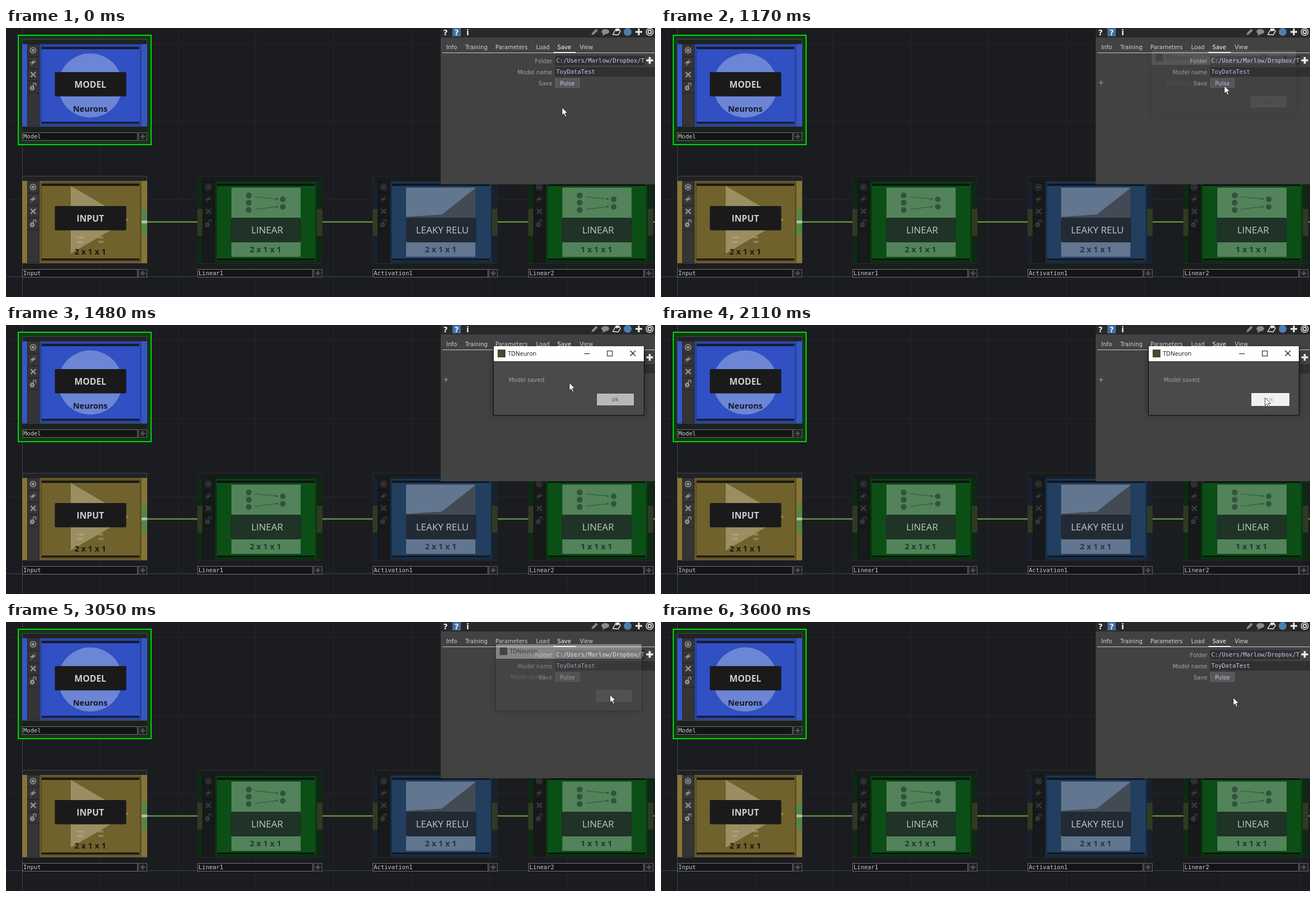
Write an HTML page that moves like this. It is 1163 by 482 pixels and loops after 3830 ms.

```html
<!DOCTYPE html>
<html lang="en">
<head>
<meta charset="utf-8">
<title>Saving a model</title>
<style>
  html, body { margin: 0; width: 100%; height: 100%; overflow: hidden; background: #1b1c20; }
  svg { display: block; width: 100vw; height: 100vh; }
  text { white-space: pre; }
  .ui { font: 10.1px "DejaVu Sans", sans-serif; }
  .mono { font: 10.5px "DejaVu Sans Mono", monospace; }
  .node { font: 17px "Open Sans", sans-serif; }
</style>
</head>
<body>
<svg id="stage" viewBox="0 0 1163 482" preserveAspectRatio="none"></svg>
<script>
const LOOP = 3830, STEP = 78.16;

const rect = (x, y, w, h, fill, more = '') =>
  `<rect x="${x}" y="${y}" width="${w}" height="${h}" fill="${fill}" ${more}/>`;
const frame = (x, y, w, h, stroke, fill = 'none', more = '') =>
  rect(x + .5, y + .5, w - 1, h - 1, fill, `stroke="${stroke}" ${more}`);
const path = (d, stroke, width = 1, fill = 'none', more = '') =>
  `<path d="${d}" stroke="${stroke}" stroke-width="${width}" fill="${fill}" ${more}/>`;
const shape = (d, fill) => `<path d="${d}" fill="${fill}"/>`;
const dot = (x, y, r, fill, more = '') => `<circle cx="${x}" cy="${y}" r="${r}" fill="${fill}" ${more}/>`;
const text = (x, y, str, fill, cls = 'ui', more = '') =>
  `<text x="${x}" y="${y}" fill="${fill}" class="${cls}" ${more}>${str}</text>`;
const centred = (x, y, str, fill, size, bold) =>
  text(x, y, str, fill, 'node', `text-anchor="middle" style="font-size:${size}px;font-weight:${bold ? 700 : 400}"`);
const plus = (x, y, r, colour, width) =>
  path(`M${x - r} ${y}h${2 * r}M${x} ${y - r}v${2 * r}`, colour, width);

function grid() {
  let s = rect(0, 0, 1163, 482, '#1b1c20');
  for (let i = 1; i < 9; i++) s += rect(Math.floor(29.5 + i * 139.45), 0, 1, 482, '#26272b');
  for (const y of [27, 167, 307]) s += rect(0, y, 1163, 1, '#26272b');
  return s + rect(29, 0, 1, 482, '#3f4150') + rect(0, 445, 1163, 1, '#32446a');
}

function flags(colour, cell, gap) {
  let s = rect(9, 9, 22, 147, gap);
  for (let i = 0; i < 4; i++) s += rect(10, 10 + i * 21.8, 20, 20.5, cell);
  s += rect(10, 97, 20, 58, cell);
  return s + dot(19.5, 20, 5, 'none', `stroke="${colour}" stroke-width="1.7"`) + dot(19.5, 20, 2.6, colour)
    + shape('M24 35L13 43.5L18.5 43L14 48.5L26 39.5L20 40.5Z', colour)
    + path('M15.2 59.2l9 8.6m0-8.6l-9 8.6', colour, 2.5)
    + dot(18, 87.5, 4.2, colour) + dot(18, 87.5, 1.2, cell)
    + path('M20 84v-3a2.3 2.3 0 0 1 4.6 0v3', colour, 1.5);
}

// One operator tile, in coordinates relative to its top left corner
function node(x, y, name, c, content) {
  const s = frame(0, 0, 224, 157, c.edge, c.top)
    + rect(0, 9, 224, 147, c.side) + rect(31, 9, 183, 147, c.body)
    + flags(c.icon, c.cell, c.gap)
    + rect(33, 11, 180, 142, c.rim) + rect(35, 12, 176, 140, c.view)
    + rect(35, 13.5, 175, 4.5, c.bar) + rect(35, 148, 175, 3.5, c.bar)
    + (c.ports || '') + content
    + frame(0, 167, 207, 15, '#747474', '#131415') + frame(208, 167, 16, 15, '#646464', '#1d1e1f')
    + plus(216, 174.5, 4.5, '#525252', 2.6) + text(2, 178, name, '#cfcfcf', 'mono');
  return `<g transform="translate(${x} ${y})">${s}</g>`;
}

const dimPorts = rect(0, 59, 9, 48, '#303a22') + rect(214, 59, 10, 48, '#303a22');
const dim = { edge: '#292c2b', top: '#181b1b', icon: '#393e3d', cell: '#17191a', gap: '#101213', bar: '#0c1410', ports: dimPorts };
const green = { ...dim, side: '#0d2913', body: '#092d10', rim: '#0a3a12', view: '#0c4f16' };
const navy = { ...dim, side: '#17222e', body: '#18283b', rim: '#1b3049', view: '#233f60', bar: '#0e1722' };
const lit = { edge: '#45474a', top: '#202226', icon: '#929292', cell: '#353535', gap: '#232323' };
const blue = { ...lit, side: '#3557c4', body: '#2a469f', rim: '#28408f', view: '#3050c3', bar: '#151b33' };
const ochre = {
  ...lit, side: '#867535', body: '#6d5c2b', rim: '#574a23', view: '#70622d', bar: '#1c1a12',
  ports: rect(214, 59, 10, 48, '#558545') + rect(214, 80, 10, 5, '#b4bdae')
};

const brightLabel = (y, base, str) => rect(58.5, y, 128, 43.5, '#1a1a1b', 'rx="2"')
  + centred(122, base, str, '#cdcdcd', 15.8, true);
const dimLabel = (str, fill, edge, ink) =>
  rect(60.5, 75.5, 124.5, 43, fill, `rx="2" stroke="${edge}"`) + centred(125, 103, str, ink, 17);

function linear(dims) {
  const ink = '#31543b';
  let s = rect(61, 21, 124, 124, '#52835a');
  for (const y of [35, 48, 61]) s += dot(92, y, 5.2, ink);
  for (const y of [42, 55.5]) s += dot(153, y, 5, ink);
  s += path('M103 37.5L143 41.5M103 60L143 55', ink, 1.2) + dot(142, 41.4, 1.8, ink) + dot(142, 55.2, 1.8, ink);
  return s + dimLabel('LINEAR', '#1f3326', '#1b2c21', '#c3c9c4') + centred(122, 137, dims, '#223c29', 14.5, true);
}

const modelArt = dot(122, 83, 57.5, '#6c85d5') + brightLabel(59, 86.5, 'MODEL')
  + centred(122, 130, 'Neurons', '#14182a', 14.5, true);

const tiny = (x, y, str) => text(x, y, str, '#d0cab0', 'ui', 'style="font-size:5px"');
const inputArt = shape('M87 18L191 78.5L87 139Z', '#9a8f63') + brightLabel(54, 81.7, 'INPUT')
  + tiny(99, 112, 'train') + tiny(136, 112, '500') + tiny(99, 119.5, 'test') + tiny(136, 119.5, '100')
  + centred(122, 141, '2 x 1 x 1', '#1e1a10', 14.5, true);

const reluArt = rect(60, 21, 124, 124, '#63768f') + shape('M60 74L123 70L184 22V77H60Z', '#424a54')
  + path('M60 74L123 70', '#39434f')
  + dimLabel('LEAKY RELU', '#222b35', '#1c242d', '#c3c7cb') + centred(122, 137, '2 x 1 x 1', '#26364a', 14.5, true);

function network() {
  const wire = (a, b) => rect(a, 346.5, b - a, 2, '#6cad45');
  return grid()
    + rect(22, 13, 238, 196, '#143619', 'stroke="#00dc05" stroke-width="2"')
    + rect(29, 20, 224, 183, '#1c211e')
    + node(29, 20, 'Model', blue, modelArt)
    + node(29, 265, 'Input', ochre, inputArt)
    + node(343, 265, 'Linear1', green, linear('2 x 1 x 1'))
    + node(657, 265, 'Activation1', navy, reluArt)
    + node(936, 265, 'Linear2', green, linear('1 x 1 x 1'))
    + wire(253, 343) + wire(567, 657) + wire(881, 936) + wire(1160, 1163);
}

function headerIcons() {
  const big = (x, str) => text(x, 12.5, str, '#f0f0f0', 'ui', 'text-anchor="middle" style="font-size:14px;font-weight:700"');
  return big(787.5, '?') + rect(800, 0, 15, 15, '#3f6f9f') + big(807.5, '?') + big(827.5, 'i')
    + shape('M1049 13l1.5-4.5 7-7 3 3-7 7z', '#8a8a8a')
    + '<ellipse cx="1074" cy="6.5" rx="7" ry="4.6" fill="#8a8a8a"/>' + shape('M1070 9l-1 5 6-3z', '#8a8a8a')
    + path('M1087.5 11.5L1092 3.5L1098 1.5L1101 6L1097 12.5Z', '#e4e4e4', 1.5) + shape('M1092 1h6l1 4-6 1z', '#e4e4e4')
    + dot(1114, 7, 7, '#4b80b0') + plus(1134, 7, 6, '#f0f0f0', 3)
    + dot(1153.5, 7, 6.3, 'none', 'stroke="#e4e4e4" stroke-width="1.5"')
    + dot(1153.5, 7, 3, 'none', 'stroke="#e4e4e4" stroke-width="1.8"');
}

function panel() {
  const tabs = { Info: 789, Training: 823, Parameters: 877, Load: 950, Save: 988, View: 1028 };
  const rows = [['Folder', 63], ['Model name', 83], ['Save', 103]];
  return rect(779, 0, 384, 280, '#424242') + rect(779, 0, 384, 17, '#292929') + headerIcons()
    + Object.entries(tabs).map(([name, x]) => text(x, 38, name, name === 'Save' ? '#fff' : '#d2d2d2')).join('')
    + rect(782, 44, 381, 1, '#c8c8c8') + rect(981, 43, 40, 2, '#f4f4f4')
    + rows.map(([name, y]) => text(979, y, name, '#a4a4a4', 'ui', 'text-anchor="end"')).join('')
    + rect(984, 50, 161, 17, '#303030') + rect(984, 70, 179, 17, '#303030')
    + text(986, 62, 'C:/Users/Marlow/Dropbox/T', '#cdc3f2', 'mono')
    + text(986, 82, 'ToyDataTest', '#cdc3f2', 'mono')
    + plus(1153.5, 58, 6, '#ededed', 3.6)
    + '<rect id="pulse" x="984.5" y="90.5" width="43" height="16" stroke="#666"/>'
    + text(1006, 103, 'Pulse', '#cdc3f2', 'ui', 'text-anchor="middle"')
    + `<g id="mark">${plus(788.5, 98, 4, '#a8a8a8', 1)}</g>`;
}

function dialog() {
  return '<g id="dialog">'
    + rect(873, 42, 271, 119, '#000', 'opacity=".4" filter="url(#soft)"')
    + frame(873, 38, 271, 124, '#0c0c0c', '#4a4a4a') + rect(874, 38, 269, 27, '#fff') + rect(874, 65, 269, 1, '#262626')
    + rect(881, 44, 14, 14, '#454a30')
    + text(899.5, 55, 'TDNeuron', '#111', 'ui', 'style="font-family:\'Open Sans\',sans-serif;font-size:10.6px"')
    + `<g id="controls">${path('M1036 51.5h10', '#111') + frame(1077, 46, 10, 10, '#111')
      + path('M1118.5 46l9.5 9.5m0-9.5l-9.5 9.5', '#111', 1.1)}</g>`
    + text(901, 102, 'Model saved.', '#a2a2a2')
    + '<rect id="ok"/>'
    + text(1091.5, 137, 'ok', '#5c5c5c', 'ui', 'id="okText" text-anchor="middle" style="font-size:10.6px"')
    + '</g>';
}

const pointer = '<path id="pointer" d="M.5 .5V14.4L3.7 11.4L6 16.8L8.3 15.8L6 10.6H10.4Z" fill="#fff" stroke="#151515" stroke-width=".8"/>';

document.getElementById('stage').innerHTML =
  '<defs><filter id="soft" x="-20%" y="-30%" width="140%" height="160%"><feGaussianBlur stdDeviation="6"/></filter></defs>'
  + network() + panel() + dialog() + pointer;

const $ = id => document.getElementById(id);
const set = (el, attrs) => { for (const k in attrs) el.setAttribute(k, attrs[k]); };
const show = (el, on) => set(el, { visibility: on ? 'visible' : 'hidden' });
const smooth = u => { u = Math.min(1, Math.max(0, u)); return u * u * (3 - 2 * u); };

// Pointer path: [tick, x, y]
const route = [
  [0, 996, 142], [1, 996.5, 140], [4, 1001, 120], [6, 1006, 107], [7, 1008, 105], [10, 1009, 103],
  [19, 1009, 103], [20, 1012, 105], [21, 1023, 115], [22, 1044, 130], [24, 1073, 144],
  [25, 1079, 141], [27, 1082, 130], [40, 1082, 130], [41, 1077, 131], [43, 1057, 134], [46, 1025, 135], [49, 1025, 135]
];
function pointerAt(k) {
  const i = Math.max(1, route.findIndex(p => p[0] >= k));
  const [a, x0, y0] = route[i - 1], [b, x1, y1] = route[i];
  const u = (k - a) / (b - a);
  return [x0 + (x1 - x0) * u, y0 + (y1 - y0) * u];
}

function draw(ms) {
  const k = Math.min(48, Math.floor((ms % LOOP + 9) / STEP));
  const [x, y] = pointerAt(k);
  set($('pointer'), { transform: `translate(${x} ${y})` });

  const overRow = k >= 6 && k < 37;
  show($('mark'), overRow);
  set($('pulse'), { fill: overRow && k < 13 ? '#6d6d6d' : '#585858' });

  const shown = smooth((k - 14) / 5) - smooth((k - 36) / 5);
  const size = 1 - .045 * (1 - shown);
  set($('dialog'), {
    opacity: shown,
    transform: `translate(1008.5 100) scale(${size}) translate(-1008.5 -100)`
  });

  const closing = k >= 37, over = k >= 25 && !closing;
  const grow = over ? 1 : 0;
  set($('ok'), {
    x: 1059.5 - grow, y: 123.5 - grow, width: 65 + 2 * grow, height: 20 + 2 * grow,
    fill: over ? '#f0f0f0' : closing ? '#6a6a6a' : '#b8b8b8',
    stroke: over ? '#fafafa' : closing ? '#8a8a8a' : '#c4c4c4'
  });
  set($('okText'), { fill: over ? '#b4b4b4' : '#5c5c5c' });
  show($('okText'), !closing);
  show($('controls'), !closing);
}

const start = performance.now();
function tick() {
  draw(performance.now() - start);
  requestAnimationFrame(tick);
}
tick();
</script>
</body>
</html>
```
